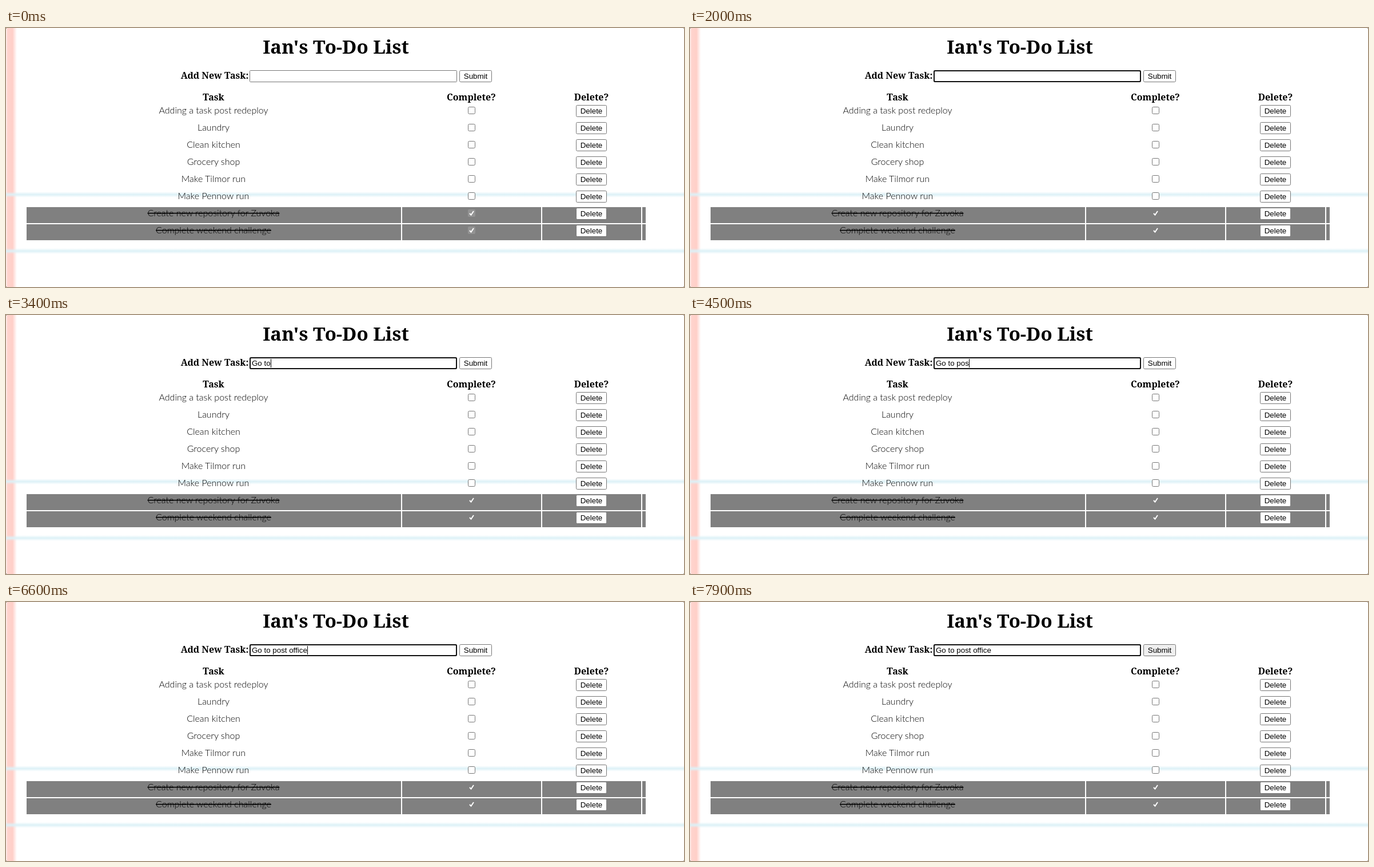
An HTML page for the animation above (8000 ms loop, 1186 by 454 pixels).

```html
<!DOCTYPE html>
<html lang="en">
<head>
<meta charset="utf-8">
<title>To-Do List</title>
<style>
  html, body { margin: 0; width: 100%; height: 100%; overflow: hidden; background: #fff; }
  svg { display: block; width: 1186px; height: 454px; }
  .serif { font: bold 16px "Noto Serif", serif; text-anchor: middle; }
  .title { font-size: 33px; }
  .task { font: 300 16px Lato, sans-serif; text-anchor: middle; }
  .done { text-decoration: line-through; }
  .ui { font: 13.333px "Liberation Sans", Arial, sans-serif; white-space: pre; }
  .mid { text-anchor: middle; }
  .box { fill: #fff; stroke: #767676; }
</style>
</head>
<body>
<svg id="stage" viewBox="0 0 1186 454">
  <defs>
    <linearGradient id="margin">
      <stop offset="0" stop-color="#fff1ef"/>
      <stop offset=".15" stop-color="#ffd3cd"/>
      <stop offset=".6" stop-color="#ffcfc8"/>
      <stop offset="1" stop-color="#fff"/>
    </linearGradient>
    <linearGradient id="rule" x2="0" y2="1">
      <stop offset="0" stop-color="#dcf1f7" stop-opacity="0"/>
      <stop offset=".5" stop-color="#dcf1f7"/>
      <stop offset="1" stop-color="#dcf1f7" stop-opacity="0"/>
    </linearGradient>
  </defs>
</svg>
<script>
const LOOP = 8000;
const FOCUS_AT = 1500, PRESS_AT = 7800;
const ENTRY = "Go to post office";
// one time per typed character
const KEYS = [2500, 2700, 2900, 3100, 3300, 3800, 4000, 4200, 4500,
              4700, 5000, 5200, 5500, 5700, 6000, 6200, 6400];
const TASKS = ["Adding a task post redeploy", "Laundry", "Clean kitchen", "Grocery shop",
               "Make Tilmor run", "Make Pennow run",
               "Create new repository for Zuvoka", "Complete weekend challenge"];
const FIRST_DONE = 6;
const CELLS = [[36, 691], [693, 936], [938, 1111], [1113, 1119]];

const stage = document.getElementById("stage");

function add(tag, attrs, text) {
  const el = document.createElementNS("http://www.w3.org/2000/svg", tag);
  for (const key in attrs) el.setAttribute(key, attrs[key]);
  if (text) el.textContent = text;
  stage.append(el);
  return el;
}
const rect = (x, y, width, height, attrs) => add("rect", { x, y, width, height, ...attrs });
const label = (x, y, cls, text) => add("text", { x, y, class: cls }, text);

function button(x, y, width, text) {
  const face = rect(x + .5, y + .5, width - 1, 20, { rx: 2, class: "box" });
  label(x + width / 2, y + 15, "ui mid", text);
  return face;
}

// paper
rect(0, 0, 19, 454, { fill: "url(#margin)" });
for (const y of [292, 391]) rect(0, y - 5, 1186, 10, { fill: "url(#rule)" });
for (const x of [0, 1185]) for (const y of [0, 453]) rect(x, y, 1, 1, { fill: "#777" });

// heading and form
label(577, 45, "serif title", "Ian's To-Do List");
label(365, 89, "serif", "Add New Task:");
rect(426.5, 74.5, 362, 20, { rx: 1, class: "box" });
const ring = rect(427, 75, 361, 19, { rx: 2, fill: "#fff", stroke: "#101010", "stroke-width": 2 });
const entry = label(430, 89, "ui", "");
const caret = rect(0, 77, 1, 15, { fill: "#000" });
const submit = button(793, 74, 57, "Submit");

// table
label(363, 127, "serif", "Task");
label(814, 127, "serif", "Complete?");
label(1024, 127, "serif", "Delete?");
const fadedBoxes = [], doneFaces = [];
TASKS.forEach((task, i) => {
  const y = 134 + i * 30, done = i >= FIRST_DONE;
  if (done) for (const [a, b] of CELLS) rect(a, y, b - a, 28, { fill: "#808080" });
  label(363, y + 16, done ? "task done" : "task", task);
  if (done) {
    fadedBoxes.push(rect(808, y + 4, 13, 13, { rx: 2, fill: "#939393" }));
    add("path", { d: `M811 ${y + 11}l2.5 2.7 4.5-6.7`, fill: "none", stroke: "#fff", "stroke-width": 2 });
  } else {
    rect(808.5, y + 4.5, 12, 12, { rx: 2, class: "box" });
  }
  const face = button(997, y + 1, 54, "Delete");
  if (done) doneFaces.push(face);
});

const show = (el, on) => el.setAttribute("visibility", on ? "visible" : "hidden");

function caretOn(t, typed) {
  if (t < FOCUS_AT || t >= PRESS_AT) return false;
  const last = typed ? KEYS[typed - 1] : FOCUS_AT;
  return Math.floor((t - last) / 500) % 2 === 0;
}

function draw(t) {
  const typed = KEYS.filter(at => at <= t).length;
  const focused = t >= FOCUS_AT;
  entry.textContent = ENTRY.slice(0, typed);
  caret.setAttribute("x", Math.round(430 + (typed ? entry.getComputedTextLength() : 0)));
  show(ring, focused);
  show(caret, caretOn(t, typed));
  for (const el of fadedBoxes) show(el, !focused);
  for (const el of doneFaces) el.style.stroke = focused ? "#808080" : "";
  submit.style.fill = t >= PRESS_AT ? "#efefef" : "";
}

const start = performance.now();
function tick() {
  draw((performance.now() - start) % LOOP);
  requestAnimationFrame(tick);
}
tick();
</script>
</body>
</html>
```
